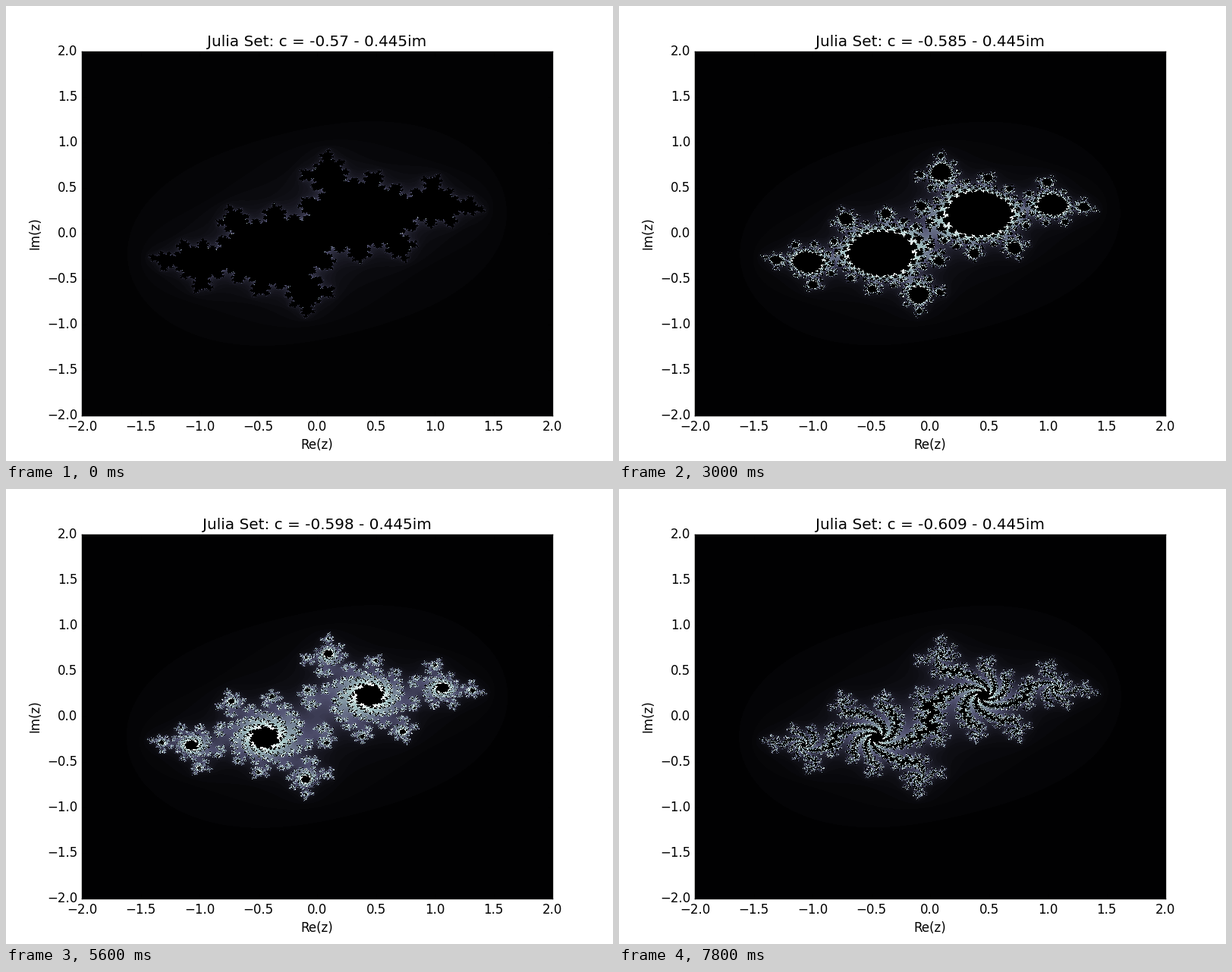
Write a matplotlib script that moves like this. It is 800 by 600 pixels and loops after 8000 ms.

```python
import numpy as np
import matplotlib.pyplot as plt
from matplotlib.animation import FuncAnimation

plt.style.use("classic")
plt.rcParams["font.family"] = "DejaVu Sans"

FRAMES = 40
INTERVAL = 200
MAX_ITER = 100
COLS, ROWS = 620, 480
IM_C = -0.445


def centres(n):
    """Midpoints of n equal cells spanning -2 to 2."""
    return (np.arange(n) + 0.5) * 4 / n - 2


PLANE = (centres(COLS)[None, :] + 1j * centres(ROWS)[:, None]).ravel()


def julia(c):
    """Escape counts from 1 up; points that never escape stay at zero."""
    counts = np.zeros(PLANE.size)
    index = np.arange(PLANE.size)
    z = PLANE
    for n in range(1, MAX_ITER + 1):
        z = z * z + c
        inside = z.real**2 + z.imag**2 <= 4
        counts[index[~inside]] = n
        index, z = index[inside], z[inside]
    return counts.reshape(ROWS, COLS)


fig, ax = plt.subplots(figsize=(8, 6), dpi=100, facecolor="white")
image = ax.imshow(np.zeros((ROWS, COLS)), cmap="bone",
                  extent=(-2, 2, -2, 2), origin="lower", aspect="auto",
                  interpolation="nearest")
ticks = np.arange(-2, 2.1, 0.5)
ax.set_xticks(ticks)
ax.set_yticks(ticks)
ax.set_xlabel("Re(z)")
ax.set_ylabel("Im(z)")
title = ax.set_title("")


def update(i):
    re_c = -0.57 - i / 1000
    label = f"{re_c:.3f}".rstrip("0")
    counts = julia(complex(re_c, IM_C))
    image.set_data(counts)
    image.set_clim(0, counts.max())
    title.set_text(f"Julia Set: c = {label} - {-IM_C}im")
    return image, title


anim = FuncAnimation(fig, update, frames=FRAMES, interval=INTERVAL,
                     init_func=lambda: update(0), repeat=True, repeat_delay=0)
plt.show()
```
